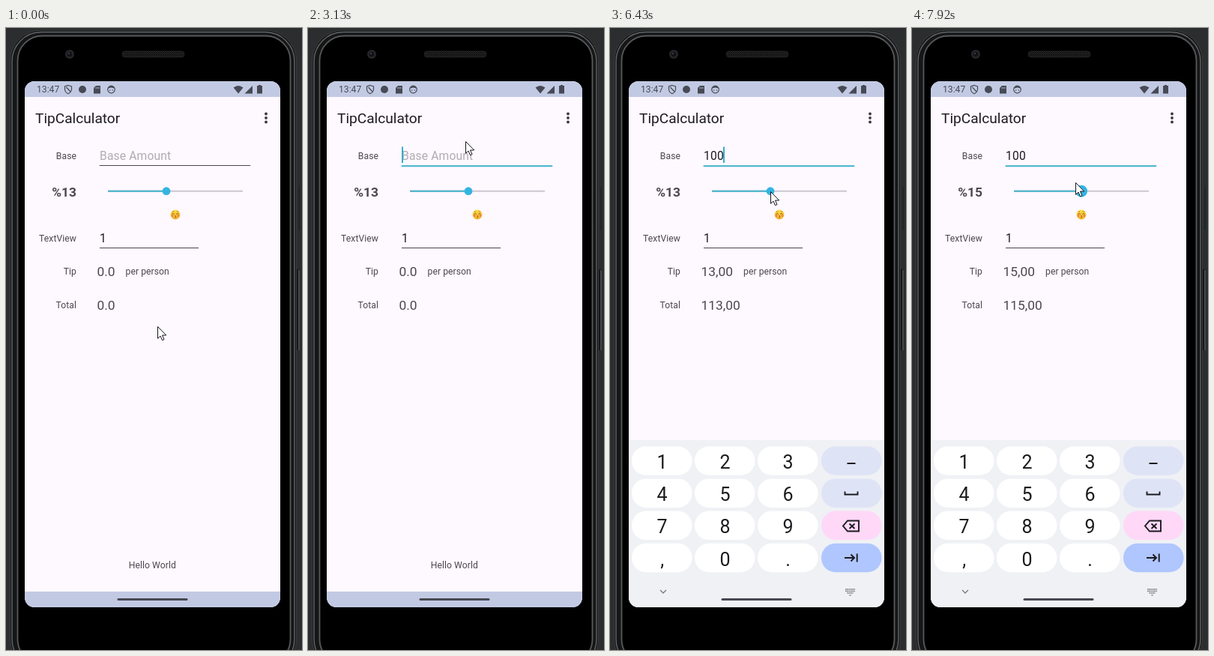
An HTML page for the animation above (7990 ms loop, 395 by 830 pixels).

```html
<!DOCTYPE html>
<html lang="en">
<head>
<meta charset="utf-8">
<title>Tip calculator demo</title>
<style>
html, body { margin: 0; width: 100%; height: 100%; overflow: hidden; background: #2b2d2f; }
svg { display: block; width: 395px; height: 830px; font-family: Roboto, sans-serif; }
.label { font-size: 12.15px; letter-spacing: .006em; fill: #4b4750; }
.value { font-size: 17.4px; fill: #4b4750; }
.field { font-size: 15.63px; letter-spacing: .01em; fill: #1d1b20; }
.right { text-anchor: end; }
.key { font-size: 25px; text-anchor: middle; fill: #1b1b1f; }
.line { fill: none; stroke: #1b1b1f; stroke-width: 1.9; }
</style>
</head>
<body>
<svg viewBox="0 0 395 830">
  <defs>
    <pattern id="mesh" width="3" height="3" patternUnits="userSpaceOnUse">
      <rect width="3" height="3" fill="#262626"/><path d="M0 0L3 3M3 0L0 3" stroke="#0b0b0b" stroke-width=".8"/>
    </pattern>
    <linearGradient id="face" x2="0" y2="1">
      <stop stop-color="#ffdf45"/><stop offset="1" stop-color="#f5ae2c"/>
    </linearGradient>
    <clipPath id="screen"><rect x="25" y="71" width="341" height="702" rx="13"/></clipPath>
  </defs>

  <!-- phone body -->
  <rect width="395" height="830" fill="#2b2d2f"/>
  <rect x="388" y="322" width="4" height="108" rx="1" fill="#161718"/>
  <path d="M391 323V430" stroke="#77797a"/>
  <path d="M391 212V270" stroke="#1c1d1e"/>
  <rect x="5.500" y="3" width="382" height="854" rx="41" fill="#151617" stroke="#3c3d3e"/>
  <rect x="8" y="5.500" width="377" height="849" rx="39" fill="none" stroke="#636465" stroke-width="1.400"/>
  <rect x="15.500" y="10.500" width="364" height="838" rx="33" stroke="#58595a" stroke-width="1.800"/>
  <circle cx="85" cy="35" r="6" fill="#252629"/>
  <circle cx="85" cy="35" r="3.300" fill="#111216"/>
  <circle cx="84" cy="34" r="1.200" fill="#3b3d47"/>
  <rect x="155" y="31" width="83" height="8" rx="4" fill="url(#mesh)" stroke="#2a2a2a" stroke-width=".7"/>

  <g clip-path="url(#screen)">
    <rect x="25" y="71" width="341" height="702" fill="#fef8ff"/>
    <path d="M25 71H366V92H25ZM25 752H366V773H25Z" fill="#c2cae3"/>

    <!-- status bar -->
    <g fill="#474a55">
      <text x="41" y="86" font-size="12.15">13:47</text>
      <path d="M83 76.500L87.500 78V82Q87 86 83 87.700Q79 86 78.500 82V78Z" fill="none" stroke="#474a55" stroke-width="1.200"/>
      <path d="M80.500 79L86 85" stroke="#474a55" stroke-width="1.200"/>
      <circle cx="102" cy="82" r="5"/>
      <path d="M120 77H125.500Q126 77 126 77.500V87.500H117V80Z"/>
      <path d="M120 79V81M122 79V81M124 79V81" stroke="#c2cae3" stroke-width=".8"/>
      <circle cx="140.500" cy="82" r="4.800" fill="none" stroke="#474a55" stroke-width="1.200"/>
      <path d="M136 81Q140.500 78 145 81Q144 77.500 140.500 77Q137 77.500 136 81Z"/>
      <circle cx="138.700" cy="83" r=".8"/><circle cx="142.300" cy="83" r=".8"/>
      <path d="M303.500 79.500Q310 74.500 316.500 79.500L310 87.500Z"/>
      <path d="M329 77V87.500H318.500Z"/>
      <path d="M337 76H340V77H342V87.500H335V77H337Z"/>
    </g>

    <!-- app -->
    <text x="39" y="127" font-size="19.1" fill="#1d1b20">TipCalculator</text>
    <g fill="#3c3940"><circle cx="347" cy="114.500" r="1.900"/><circle cx="347" cy="120" r="1.900"/><circle cx="347" cy="125.500" r="1.900"/></g>
    <g class="label">
      <g class="right">
        <text x="94" y="175">Base</text><text x="94" y="285">TextView</text>
        <text x="94" y="329">Tip</text><text x="94" y="374">Total</text>
      </g>
      <text id="perPerson" y="329">per person</text>
      <text x="163.700" y="721">Hello World</text>
    </g>
    <text id="percent" class="value right" x="94" y="224.500" font-weight="700"></text>
    <text id="tip" class="value" x="121.500" y="331"></text>
    <text id="total" class="value" x="121.500" y="376"></text>
    <text id="base" class="field" x="125" y="176"></text>
    <text class="field" x="125" y="286">1</text>
    <rect id="underline" x="124.700" width="201.500"/>
    <rect x="125" y="293" width="132" height="1" fill="#49454f"/>
    <rect id="caret" y="158.500" width="2" height="21.500" fill="#35afcc"/>
    <rect x="136" y="216.700" width="180" height="2" fill="#cbc6cf"/>
    <rect id="track" x="136" y="216.700" height="2" fill="#40b3ca"/>
    <circle id="thumb" cy="217.700" fill="#33b5e1"/>

    <g transform="translate(226 249)" fill="none" stroke="#6b4318" stroke-linecap="round">
      <circle r="6.400" fill="url(#face)" stroke="none"/>
      <g fill="#f3843c" stroke="none"><circle cx="-4" cy="1.500" r="1.500"/><circle cx="4" cy="1.500" r="1.500"/></g>
      <path d="M-4.300 -.8Q-2.800 -2.600 -1.300 -.8M1.300 -.8Q2.800 -2.600 4.300 -.8M-.3 1.400Q1.700 1.700 .2 2.700Q1.800 3.300 -.3 4.100" stroke-width=".8"/>
      <path d="M-4 -3.700L-2 -4.400M4 -3.700L2 -4.400" stroke-width=".5"/>
    </g>

    <!-- keyboard -->
    <g id="keyboard">
      <rect x="25" y="550" width="341" height="223" fill="#eff1f5"/>
      <g id="keys"></g>
      <g class="line">
        <path d="M316.500 581H327.500M313.500 618.500V622.500H330.500V618.500"/>
        <path d="M317 657.500H332V671.500H317L311 664.500ZM319.500 661.500L326.500 668M326.500 661.500L319.500 668"/>
        <path d="M313 707H326M321.500 702.500L326 707L321.500 711.500M329.700 701.500V712.500"/>
      </g>
      <g id="navIcons" fill="none" stroke="#77797e">
        <path d="M67 750L71 754L75 750" stroke-width="1.300"/>
        <path d="M314 749H327M314 751.500H327M316.500 754H324.500" stroke-width="1.600" stroke-dasharray="1.700 .6"/>
        <path d="M318.500 756.500H322.500L320.500 758Z" fill="#77797e" stroke="none"/>
      </g>
    </g>
    <rect x="148.500" y="761" width="94" height="3" rx="1.500" fill="#464950"/>
  </g>

  <path id="cursor" d="M.5 .5V16.300L4 13L6.500 18.700L9 17.600L6.500 12H11.700Z" fill="#fff" stroke="#16161a" stroke-linejoin="round"/>
</svg>

<script>
const LOOP = 7990;
const el = id => document.getElementById(id);
const set = (id, attrs) => {
  for (const name in attrs) el(id).setAttribute(name, attrs[name]);
};
const within = (t, spans) => spans.some(([from, to]) => t >= from && t < to);

// Pointer moves: start, end, number of steps, then the pose reached: x, y, slider value.
const REST = [202, 398, 13];
const MOVES = [
  [90, 870, 11, [210, 229, 13]],
  [940, 1180, 4, [206, 203, 13]],
  [1250, 1480, 4, [214, 180, 13]],
  [2400, 2630, 4, [210, 151, 13]],
  [5000, 5140, 3, [173, 383, 13]],
  [5210, 5760, 8, [214, 218, 13]],
  [6680, 7150, 7, [261, 218, 20]],
  [7230, 7450, 4, [279, 218, 23]],
  [7620, 7920, 5, [218, 206, 15]]
];
const CARET = [[3130, 4440], [5430, 5930], [6430, 6930], [7430, 7920]];
const PRESSED = 2060, FOCUSED = 2400, KEYBOARD = 4210, ICONS = 4440, TYPED = 5000, GRAB = 6680;

const smooth = p => p * p * (3 - 2 * p);

function poseAt(t) {
  let pose = REST;
  for (const [start, end, steps, goal] of MOVES) {
    if (t < start) break;
    const step = Math.floor((t - start) / (end - start) * (steps - 1) + 1e-6);
    const p = smooth(Math.min(1, (step + 1) / steps));
    pose = pose.map((v, i) => v + (goal[i] - v) * p);
  }
  return pose;
}

function buildKeys() {
  const columns = [29, 113, 197, 282];
  const sideColors = ['#dfe3f6', '#dfe3f6', '#ffd8f8', '#b0c6ff'];
  const rows = ['123', '456', '789', ',0.'];
  el('keys').innerHTML = rows.map((row, r) => columns.map((x, c) => {
    const y = 558.2 + r * 43.2;
    const label = row[c] ? `<text class="key" x="${x + 40.6}" y="${y + 29.8}">${row[c]}</text>` : '';
    return `<rect x="${x}" y="${y}" width="80.5" height="38.5" rx="19" fill="${row[c] ? '#fff' : sideColors[r]}"/>${label}`;
  }).join('')).join('');
}

function render(t) {
  const [x, y, rawValue] = poseAt(t);
  const value = Math.floor(rawValue + 1e-6);
  const thumbX = 136 + value * 6;
  const typed = t >= TYPED, focused = t >= PRESSED;

  set('cursor', { transform: `translate(${Math.round(x)} ${Math.round(y)})` });
  set('thumb', { cx: thumbX, r: t >= GRAB ? 8 : 5.4 });
  set('track', { width: thumbX - 136 });
  el('percent').textContent = '%' + value;
  el('tip').textContent = typed ? value + ',00' : '0.0';
  el('total').textContent = typed ? 100 + value + ',00' : '0.0';
  set('perPerson', { x: typed ? 178 : 159.5 });

  el('base').textContent = typed ? '100' : 'Base Amount';
  const hint = within(t, [[PRESSED, FOCUSED]]) ? '#7d7980' : '#b0abb2';
  el('base').style.fill = typed ? '#1d1b20' : hint;
  set('underline', focused ? { y: 183.2, height: 2, fill: '#40b3ca' } : { y: 183, height: 1, fill: '#49454f' });
  set('caret', { x: typed ? 151 : 125, opacity: within(t, CARET) ? 1 : 0 });
  set('keyboard', { opacity: t >= KEYBOARD ? 1 : 0 });
  set('navIcons', { opacity: t >= ICONS ? 1 : 0.4 });
}

buildKeys();
const began = performance.now();
(function tick() {
  render((performance.now() - began) % LOOP);
  requestAnimationFrame(tick);
})();
</script>
</body>
</html>
```
